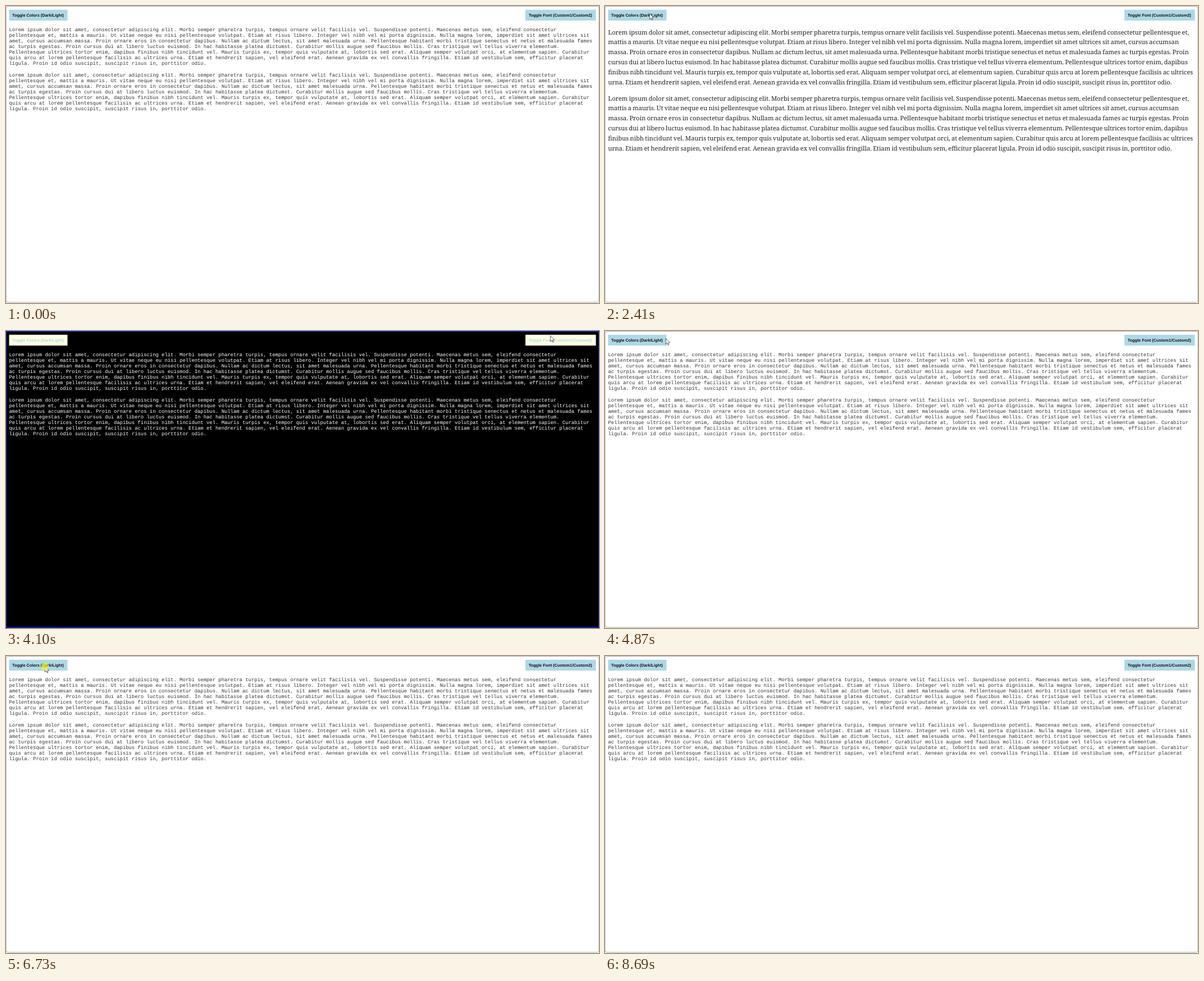
An HTML page for the animation above (9020 ms loop, 1056 by 530 pixels).

```html
<!DOCTYPE html>
<html lang="en">
<head>
<meta charset="utf-8">
<title>Theme and font toggles</title>
<style>
  html, body { margin: 0; width: 100%; height: 100%; overflow: hidden; }
  svg {
    display: block; width: 1056px; height: 530px;
    --page: #fff; --ink: #222; --mono-ink: #333; --edge: #bdbdbd;
    --button: #add8e6; --label: #111;
    background: var(--page);
    text-rendering: geometricPrecision;
  }
  svg.dark {
    --page: #000; --ink: #fff; --mono-ink: #fff; --edge: #0a35ff;
    --button: #ffffe0; --label: #add8e6;
  }
  .frame { fill: none; stroke: var(--edge); stroke-width: 1.33; }
  .button rect { fill: var(--button); }
  .button text { fill: var(--label); font: bold 7.333px Arial, "Liberation Sans", sans-serif; }
  #mono { fill: var(--mono-ink); font: 8.893px "Courier New", "Liberation Mono", monospace; }
  #serif { fill: var(--ink); font: 11px "Noto Serif", serif; word-spacing: -.05em; display: none; }
  .serif #mono { display: none; }
  .serif #serif { display: inline; }
  #ring { fill: #ff0; opacity: .65; }
  #arrow { fill: #fff; stroke: #222; stroke-width: .7; stroke-linejoin: round; }
</style>
</head>
<body>
<svg id="stage" class="serif" viewBox="0 0 1056 530">
  <rect class="frame" x=".1" y=".67" width="1055.8" height="528" rx="4"/>
  <g class="button">
    <rect x="5.5" y="6.7" width="104" height="19.3"/>
    <text x="11" y="19">Toggle Colors (Dark/Light)</text>
  </g>
  <g class="button">
    <rect x="925" y="6.7" width="125.5" height="19.3"/>
    <text x="930.7" y="19">Toggle Font (Custom1/Custom2)</text>
  </g>
  <g id="mono"></g>
  <g id="serif"></g>
  <g id="cursor">
    <path id="arrow" d="M.4 .4V10.8L2.8 8.6L4.4 12.2L6 11.5L4.4 8H7.7Z"/>
    <circle id="ring" cy=".7" r="6.3"/>
  </g>
</svg>
<script>
const LOOP = 9020;
const TICK = 70;
const COLUMN = 1036;

// "|" marks a break in the monospaced layout, "~" one in the serif layout.
const copy = 'Lorem ipsum dolor sit amet, consectetur adipiscing elit. Morbi semper pharetra turpis, ' +
  'tempus ornare velit facilisis vel. Suspendisse potenti. Maecenas metus sem, eleifend consectetur|' +
  'pellentesque et,~mattis a mauris. Ut vitae neque eu nisi pellentesque volutpat. Etiam at risus libero. ' +
  'Integer vel nibh vel mi porta dignissim. Nulla magna lorem, imperdiet sit amet ultrices sit|' +
  'amet, cursus accumsan~massa. Proin ornare eros in consectetur dapibus. Nullam ac dictum lectus, ' +
  'sit amet malesuada urna. Pellentesque habitant morbi tristique senectus et netus et malesuada fames|' +
  'ac turpis egestas. Proin~cursus dui at libero luctus euismod. In hac habitasse platea dictumst. ' +
  'Curabitur mollis augue sed faucibus mollis. Cras tristique vel tellus viverra elementum.|' +
  'Pellentesque ultrices tortor enim, dapibus~finibus nibh tincidunt vel. Mauris turpis ex, tempor quis ' +
  'vulputate at, lobortis sed erat. Aliquam semper volutpat orci, at elementum sapien. Curabitur|' +
  'quis arcu at lorem pellentesque facilisis ac ultrices~urna. Etiam et hendrerit sapien, vel eleifend erat. ' +
  'Aenean gravida ex vel convallis fringilla. Etiam id vestibulum sem, efficitur placerat|' +
  'ligula. Proin id odio suscipit, suscipit risus in, porttitor odio.';

const themeClicks = [2480, 4730, 6870, 7600];
const fontClicks = [1120, 4100, 5840, 6180];
const clicks = [...themeClicks, ...fontClicks];

// Each path is a visible stretch of pointer travel: [ms, x, y].
const paths = [
  [[240, 1022, 527], [960, 969, 9], [1760, 969, 9], [2320, 79, 13], [3250, 79, 13],
   [3950, 969, 8], [4100, 969, 8], [4580, 79, 13], [4770, 79, 13], [5690, 969, 8],
   [6180, 969, 8], [6700, 68, 18], [7570, 68, 18], [7810, 520, 534]],
  [[8400, 1031, 525], [8650, 1047, 525]]
];

const $ = id => document.getElementById(id);
const stage = $('stage'), cursor = $('cursor'), ring = $('ring'), serif = $('serif');

function setText(group, lines, top, pitch, paragraph) {
  for (let p = 0; p < 2; p++) {
    lines.forEach((line, i) => {
      const text = document.createElementNS('http://www.w3.org/2000/svg', 'text');
      text.setAttribute('x', 5.5);
      text.setAttribute('y', top + p * paragraph + i * pitch);
      text.textContent = line;
      group.append(text);
    });
  }
}

setText($('mono'), copy.replace(/~/g, ' ').split('|'), 45, 10, 81);
setText(serif, copy.replace(/\|/g, ' ').split('~'), 50.6, 17.78, 118);

// Choose the serif size at which the first line fills the column.
serif.style.fontSize = 11 * COLUMN / serif.firstChild.getComputedTextLength() + 'px';

const toggled = (times, t) => times.filter(c => c <= t).length % 2 === 1;
const smooth = u => u * u * (3 - 2 * u);

function pointerAt(t) {
  const path = paths.find(p => t >= p[0][0] && t < p[p.length - 1][0]);
  if (!path) return null;
  const i = path.findIndex(k => k[0] > t);
  const [t0, x0, y0] = path[i - 1], [t1, x1, y1] = path[i];
  const u = smooth((t - t0) / (t1 - t0));
  return [x0 + (x1 - x0) * u, y0 + (y1 - y0) * u];
}

function draw() {
  const t = performance.now() % LOOP;
  stage.classList.toggle('dark', toggled(themeClicks, t));
  stage.classList.toggle('serif', toggled(fontClicks, t));
  // The pointer moves in ticks, as in a screen recording.
  const at = pointerAt(t - (t + 30) % TICK);
  cursor.style.display = at ? '' : 'none';
  if (at) cursor.setAttribute('transform', `translate(${at.map(Math.round)})`);
  const pressed = clicks.some(c => t >= c - 2 * TICK && t < c - TICK);
  ring.style.display = pressed ? '' : 'none';
  requestAnimationFrame(draw);
}
draw();
</script>
</body>
</html>
```
